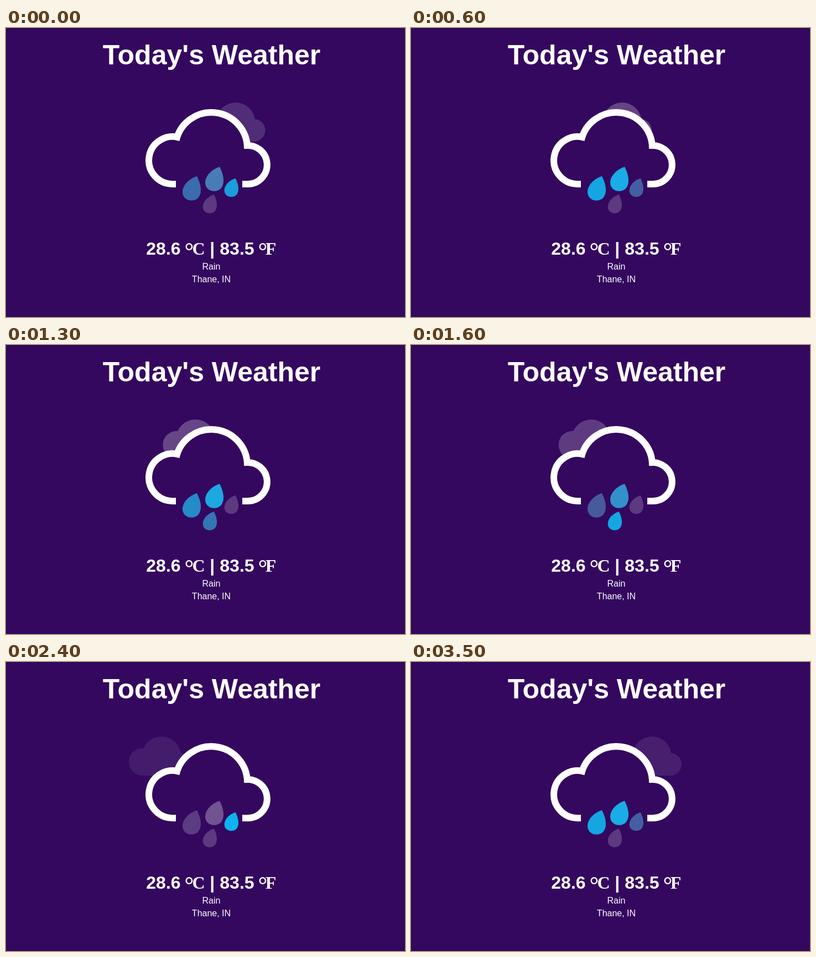
Recreate the animation shown at these times as an HTML page. Size 721 px wide and 524 px high, loop 3.55 s.

```html
<!DOCTYPE html>
<html lang="en">
<head>
<meta charset="utf-8">
<title>Today's Weather</title>
<style>
  html, body { margin: 0; width: 100%; height: 100%; overflow: hidden; background: #34085f; }
  svg { display: block; }
  text { fill: #fff; text-anchor: middle; font: 16px "Liberation Sans", Arial, sans-serif; }
  .title { font-size: 50px; font-weight: bold; }
  .temp { font-size: 32px; font-weight: bold; text-anchor: start; }
  .unit, .degree { font-family: "Liberation Serif", "Times New Roman", serif; }
  .degree { font-size: 42px; }
</style>
</head>
<body>
<svg width="721" height="524" viewBox="0 0 721 524">
  <defs>
    <path id="drop" d="M0 0C-13 4-26 15.500-26 28.500C-26 38-19 44-10 44C1 44 7 36 7 25C7 15 3 6 0 0Z"/>
  </defs>
  <path d="M.5 524V.5H721" fill="none" stroke="#2a0a4c"/>
  <text class="title" x="371.5" y="66">Today's Weather</text>

  <g id="puff" fill="#fff">
    <circle cx="-34" cy="11" r="25"/>
    <circle r="35"/>
    <circle cx="33" cy="15.5" r="20.5"/>
    <path d="M-34 11H33V36H-34Z"/>
  </g>

  <g fill="#34085f">
    <circle cx="301" cy="240" r="43"/>
    <circle cx="371" cy="218" r="65"/>
    <circle cx="437" cy="248" r="35"/>
  </g>
  <path fill="none" stroke="#fff" stroke-width="12" d="M307 283H301A43 43 0 1 1 315 199.3
    M307.6 203.7A65 65 0 0 1 436 218V219
    M431.5 213.4A35 35 0 1 1 437 283H427"/>

  <g id="drops"></g>

  <text class="temp" y="411">
    <tspan x="253.3">28.6</tspan>
    <tspan class="degree" x="322.6" y="418">°</tspan>
    <tspan class="unit" x="336.4" y="411">C</tspan>
    <tspan x="368.3">|</tspan>
    <tspan x="386.3">83.5</tspan>
    <tspan class="degree" x="455.4" y="418">°</tspan>
    <tspan class="unit" x="468.8" y="411">F</tspan>
  </text>
  <text x="371" y="438">Rain</text>
  <text x="371" y="461">Thane, IN</text>
</svg>
<script>
const LOOP = 3550, STEP = 50;
const RAIN = 2900, RAIN_START = 520;
const DRIFT = RAIN * 4 / 3, DRIFT_START = 949;
const BLUE = [0, 198, 255], BACK = [52, 8, 95];

// rise, peak and end are fractions of the rain cycle; rest is the idle white opacity
const drops = [
  { x: 345, y: 268.7, size: 1, rest: .2, rise: 0, peak: .5, end: .8 },
  { x: 386, y: 251.7, size: 1, rest: .3, rise: 0, peak: .5, end: 1 },
  { x: 414.6, y: 272.4, size: .77, rest: .2, rise: .73, peak: 1.05, end: 1.51 },
  { x: 375.7, y: 302, size: .77, rest: .2, rise: .5, peak: .8, end: 1 }
];

const puff = document.getElementById("puff");
const group = document.getElementById("drops");
for (const d of drops) {
  d.node = document.createElementNS("http://www.w3.org/2000/svg", "use");
  d.node.setAttribute("href", "#drop");
  d.node.setAttribute("transform", `translate(${d.x} ${d.y}) scale(${d.size})`);
  group.append(d.node);
}

const mix = (a, b, p) => a + (b - a) * p;

function glow({ rise, peak, end }, phase) {
  const p = phase < rise ? phase + 1 : phase;
  return Math.max(0, Math.min((p - rise) / (peak - rise), (end - p) / (end - peak)));
}

function draw(t) {
  const drift = (t + DRIFT_START) / DRIFT % 1;
  puff.setAttribute("transform", `translate(${468 - 216 * drift} 170)`);
  puff.setAttribute("opacity", .3 * (1 - Math.abs(2 * drift - 1)));

  const phase = (t + RAIN_START) / RAIN % 1;
  for (const d of drops) {
    const p = glow(d, phase);
    const rgb = BLUE.map((c, i) => Math.round(mix(mix(BACK[i], 255, d.rest), c, p)));
    d.node.setAttribute("fill", `rgb(${rgb})`);
  }
}

const start = performance.now();
function tick() {
  const t = (performance.now() - start) % LOOP;
  draw(Math.floor(t / STEP) * STEP);
  requestAnimationFrame(tick);
}
tick();
</script>
</body>
</html>
```
